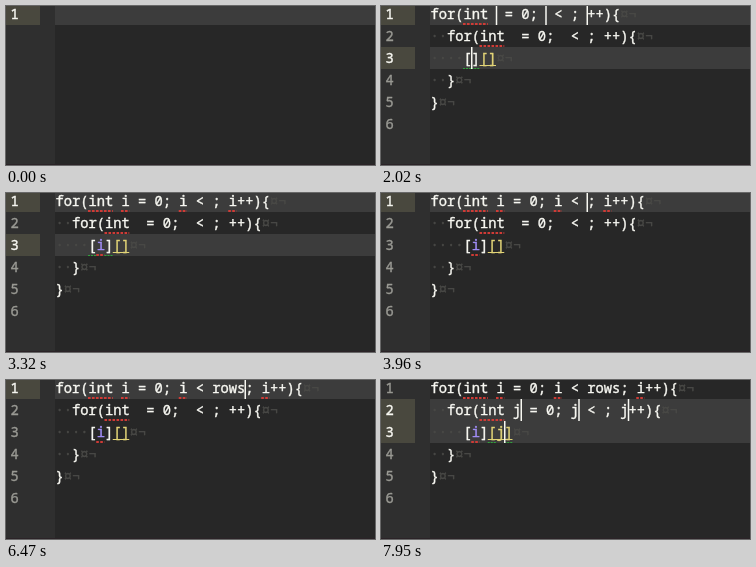
An HTML page for the animation above (8000 ms loop, 369 px wide and 159 px high).

```html
<!DOCTYPE html>
<html lang="en">
<head>
<meta charset="utf-8">
<title>Nested loop snippet</title>
<style>
  html, body { margin: 0; width: 100%; height: 100%; overflow: hidden; background: #272727; }
  svg { display: block; }
  text {
    font: 13.75px "Noto Sans Mono", "DejaVu Sans Mono", monospace;
    white-space: pre;
    stroke-width: .4px;
  }
  .bold { font-weight: 700; stroke-width: 0; }
  .note { font-size: 12.4px; }
  .popup { filter: drop-shadow(1px 2px 2px rgba(0, 0, 0, .45)); }
</style>
</head>
<body>
<svg id="stage" width="369" height="159" viewBox="0 0 369 159"></svg>
<script>
const LOOP = 8000, CHAR = 8.25, ROW = 22, LEFT = 49;
const WHITE = '#f8f8f2', FAINT = '#4a4a47', PURPLE = '#a08cf5', YELLOW = '#e2d477';
const stage = document.getElementById('stage');

// Each step changes part of the editor state at a given time.
const steps = [
  [0, { typed: '', match: 0, popup: '', expanded: false, field: '', caret: false,
        outer: '', inner: '', limit: '', spell: null, active: [0] }],
  [350, { typed: 'f', field: 'typed', caret: true }],
  [480, { popup: 'loop', match: 1 }],
  [680, { typed: 'fo' }],
  [770, { typed: 'for', match: 2 }],
  [860, { match: 3 }],
  [1290, { typed: 'for2' }],
  [1330, { match: 4 }],
  [1740, { expanded: true, popup: '', field: 'outer', active: [0, 2] }],
  [2020, { spell: /\bint\b/g }],
  [2200, { caret: false }],
  [2480, { outer: 'i', caret: true }],
  [2580, { popup: 'tags', match: 1 }],
  [2760, { spell: /\b(int|i)\b/g }],
  [2940, { caret: false }],
  [3040, { popup: '', caret: true }],
  [3320, { caret: false }],
  [3730, { caret: true }],
  [3960, { field: 'limit', active: [0] }],
  [5960, { limit: 'r' }],
  [6060, { limit: 'ro' }],
  [6190, { limit: 'row' }],
  [6470, { limit: 'rows' }],
  [6880, { field: 'inner', active: [1, 2] }],
  [7390, { caret: false }],
  [7770, { caret: true }],
  [7950, { inner: 'j' }]
];

const popups = {
  loop: { x: 8, y: 19, width: 246, items: [['for2', 'iterate two dimensi…']] },
  tags: { x: 49, y: 63, width: 200, items: [['i', 'italic text'], ['img', 'embedded image']] }
};

const escapeText = s => s.replace(/&/g, '&amp;').replace(/</g, '&lt;');
const rect = (x, y, w, h, fill) =>
  `<rect x="${x}" y="${y}" width="${w}" height="${h}" fill="${fill}"/>`;
const label = (x, y, s, fill, cls = '') =>
  s ? `<text x="${x}" y="${y}" fill="${fill}" stroke="${fill}" class="${cls}">${escapeText(s)}</text>` : '';
const rowTop = row => row * ROW - 3;
const colX = col => LEFT + col * CHAR;
const run = (col, row, s, fill) => label(colX(col) + .4, rowTop(row) + 16, s, fill);
const line = (x, y, w, style) => `<path d="M${x} ${y}h${w}" fill="none" ${style}/>`;

// Source lines; "|" marks a caret behind the field being edited.
function sourceLines(s) {
  const field = name => s[name] + (s.field === name ? '|' : '');
  if (!s.expanded) return [field('typed')];
  const [a, b, n] = ['outer', 'inner', 'limit'].map(field);
  return [
    `for(int ${a} = 0; ${a} < ${n}; ${a}++){`,
    `  for(int ${b} = 0; ${b} < ; ${b}++){`,
    `    [${a}][${b}]`,
    '  }',
    '}',
    ''
  ];
}

function drawIndex(text, row) {
  const split = text.indexOf('][') + 1;
  const y = rowTop(row) + 18.5;
  return run(4, row, '[', WHITE) +
    run(5, row, text.slice(5, split - 1), PURPLE) +
    run(split - 1, row, ']', WHITE) +
    run(split, row, text.slice(split), YELLOW) +
    line(colX(split), y, (text.length - split) * CHAR, `stroke="${YELLOW}"`);
}

function drawLine(s, marked, row) {
  const text = marked.replace(/\|/g, '');
  const indent = text.search(/\S|$/);
  const top = rowTop(row);
  let out = run(0, row, '·'.repeat(indent), FAINT);
  out += text.includes('][') ? drawIndex(text, row) : run(indent, row, text.slice(indent), WHITE);
  if (s.expanded && text) out += run(text.length, row, '¤¬', FAINT);
  if (s.spell) for (const word of text.matchAll(s.spell))
    out += line(colX(word.index), top + 21, word[0].length * CHAR,
      'stroke="#cf3b36" stroke-width="2" stroke-dasharray="2.6 1.4"');
  marked.split('|').slice(0, -1).reduce((col, part) => {
    col += part.length;
    if (row === 2) {
      const open = text.lastIndexOf('[', col - 1), close = text.indexOf(']', col);
      for (const c of [open, close])
        out += line(colX(c), top + 21.5, CHAR, 'stroke="#2fa43a" stroke-dasharray="2 1"');
    }
    if (s.caret) out += rect(colX(col) - .25, top, 1.5, ROW, WHITE);
    return col;
  }, 0);
  return out;
}

function drawPopup({ x, y, width, items }, match) {
  const nameX = x + 41;
  const noteX = nameX + Math.max(...items.map(([name]) => name.length)) * CHAR + 13;
  const rows = items.map(([name, note], i) => {
    const top = y + i * 30, base = top + 19.5, mid = top + 15;
    return rect(x, top, width, 30, i ? '#323232' : '#3d3d3d') +
      rect(x, top, 30, 30, i ? '#3a4436' : '#4c5946') +
      `<path d="M${x + 7} ${mid}h8M${x + 22} ${mid - 5}v10" stroke="#8fc46c" stroke-width="2"/>` +
      `<path d="M${x + 13} ${mid - 4}l6 4l-6 4z" fill="#8fc46c"/>` +
      label(nameX, base, name.slice(0, match), '#fff', 'bold') +
      label(nameX + match * CHAR, base, name.slice(match), '#d4d4d4') +
      label(noteX, base, note, i ? '#858585' : '#9b9b9b', 'note');
  });
  return `<g class="popup">${rows.join('')}</g>`;
}

function render(s) {
  const lines = sourceLines(s);
  let out = rect(0, 0, 369, 159, '#272727') + rect(0, 0, LEFT, 159, '#2f2f2f');
  for (const row of s.active)
    out += rect(0, rowTop(row), 34, ROW, '#49483e') + rect(LEFT, rowTop(row), 320, ROW, '#3c3c3c');
  out += rect(0, 158, 369, 1, '#2b2327');
  lines.forEach((text, row) => {
    out += label(4.5, rowTop(row) + 16, String(row + 1), s.active.includes(row) ? WHITE : '#9a9a94');
    out += drawLine(s, text, row);
  });
  if (s.popup) out += drawPopup(popups[s.popup], s.match);
  stage.innerHTML = out;
}

let shown = -1;
function tick() {
  const time = performance.now() % LOOP;
  const index = steps.findLastIndex(([start]) => start <= time);
  if (index !== shown) {
    shown = index;
    render(Object.assign({}, ...steps.slice(0, index + 1).map(([, change]) => change)));
  }
  requestAnimationFrame(tick);
}
tick();
</script>
</body>
</html>
```
